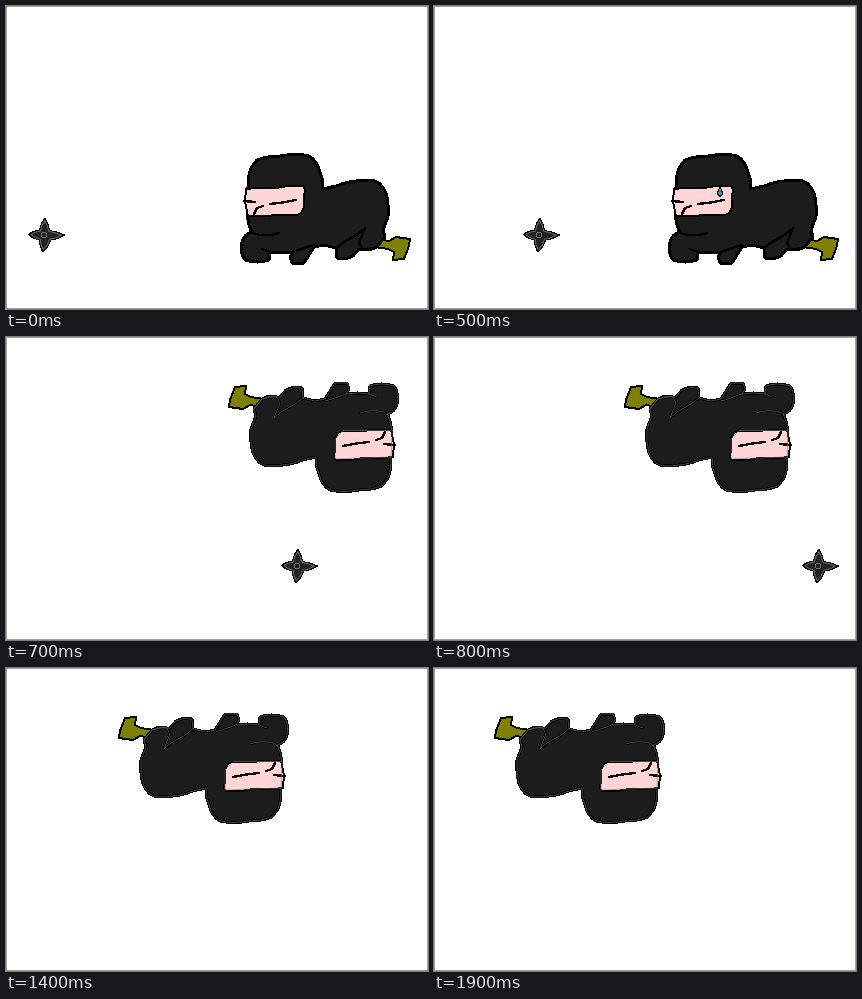
Recreate the animation shown at these times as an HTML page. Size 422x303 px, loop 2400 ms.

```html
<!DOCTYPE html>
<html lang="en">
<head>
<meta charset="utf-8">
<title>Ninja dodge</title>
<style>
html, body { margin: 0; width: 100%; height: 100%; overflow: hidden; background: #fff; }
svg { display: block; width: 100vw; height: 100vh; }
path { stroke-linejoin: round; stroke-linecap: round; }
.ink { fill: none; stroke: #000; stroke-width: 2.4; }
.glint { fill: none; stroke: #777; stroke-width: .6; }
</style>
</head>
<body>
<svg viewBox="0 0 422 303" shape-rendering="crispEdges">
  <defs>
    <path id="body" d="M242 181 Q242 169 245 162 L251 154 Q261 150 274 150 Q291 147 303 150 Q311 155 313 163 L316 172 L317 183 L330 180 Q344 174 365 174 Q375 175 380 187 Q383 198 382 211 L377 224 L379 231 L371 241 Q364 245 357 243 L353 243 L347 250 Q339 254 331 252 L330 242 L318 239 L308 241 L303 249 L298 257 L286 257 L284 251 L287 246 Q275 248 264 246 L263 254 Q252 258 239 254 Q234 248 236 236 Q238 228 246 226 L243 219 L241 209 Z"/>
    <path id="limbs" d="M273 227 Q262 231 249 228 L244 224 M379 231 L371 241 L357 244 L353 237 L359 222 M359 222 L352 228 L338 236 L330 242 M264 246 L256 243 M287 246 L301 241 L308 239"/>
    <path id="face" d="M240 183 Q255 181 270 182 Q284 179 297 180 Q300 182 298 190 L298 201 Q296 209 289 209 L242 210 L239 196 Z"/>
    <path id="blade" d="M-1.5 -17 Q2 -12 3 -5 Q10 -4 18 -.5 Q11 4 4 4.500 Q2 12 -3.500 16.500 Q-7 11 -7 4.500 Q-14 3 -18 -1 Q-13 -5 -7 -5 Q-6 -12 -1.500 -17 Z"/>
  </defs>
  <rect width="422" height="303" fill="#fff"/>
  <g id="ninja">
    <path d="M371 233 L383 235 L390 231 L404 233 L403 240 L398 253 L387 254 L388 246 L382 243 L369 241 Z" fill="#808000" stroke="#000" stroke-width="2"/>
    <use href="#body" fill="#1c1c1c" stroke="#000" stroke-width="3"/>
    <use href="#limbs" class="ink"/>
    <use href="#face" fill="#ffd5d5" stroke="#000" stroke-width="2"/>
    <path class="ink" d="M238 195 L249 196 M264 198 Q277 197 290 194 M248 208 L251 202 L257 200"/>
    <g id="edges" class="glint">
      <use href="#body"/>
      <use href="#limbs"/>
      <path d="M242 209.5 H290 L298 201 V181 L270 182 L242 183"/>
    </g>
    <path id="sweat" d="M286 181 L288 185 Q289 190 286 190 Q283 190 284 185 Z" fill="#20a5b5" stroke="#000" stroke-width="1.3"/>
  </g>
  <g id="star">
    <use href="#blade" fill="#222" stroke="#000" stroke-width="1.2"/>
    <use href="#blade" transform="translate(-.3 0) scale(.85)" fill="none" stroke="#aaa" stroke-width=".7"/>
    <ellipse cx="-2.500" cy="-.5" rx="3" ry="2.500" fill="#222" stroke="#999" stroke-width=".7"/>
  </g>
  <rect x=".5" y=".5" width="421" height="302" fill="none" stroke="#a0a0a0"/>
</svg>
<script>
const LOOP = 2400;
const REST = { x: 320, y: 203 };
// Each pose holds until the next one: star is its centre, x, y and turn place the ninja.
const poses = [
  { at: 0, star: 40.5, ...REST, turn: 0 },
  { at: 500, star: 107.5, ...REST, turn: 0, sweat: true },
  { at: 600, star: 200.5, x: 313.5, y: 151.5, turn: 90 },
  { at: 700, star: 293.5, x: 307, y: 100, turn: 180 },
  { at: 800, star: 386.5, x: 275, y: 100, turn: 180 },
  { at: 900, x: 242, y: 100, turn: 180 },
  { at: 1400, x: 197, y: 100, turn: 180 },
  { at: 1900, x: 145, y: 100, turn: 180 }
];
const el = id => document.getElementById(id);
const ninja = el("ninja"), star = el("star"), sweat = el("sweat"), edges = el("edges");
const show = (node, on) => node.setAttribute("visibility", on ? "visible" : "hidden");

function draw(time) {
  const { star: starX, x, y, turn, sweat: sweating } = poses.findLast(p => p.at <= time);
  ninja.setAttribute("transform", `translate(${x} ${y}) rotate(${turn}) translate(${-REST.x} ${-REST.y})`);
  show(edges, turn);
  show(sweat, sweating);
  show(star, starX);
  if (starX) star.setAttribute("transform", `translate(${starX} 229.5)`);
}

const start = performance.now();
function tick() {
  draw((performance.now() - start) % LOOP);
  requestAnimationFrame(tick);
}
tick();
</script>
</body>
</html>
```
